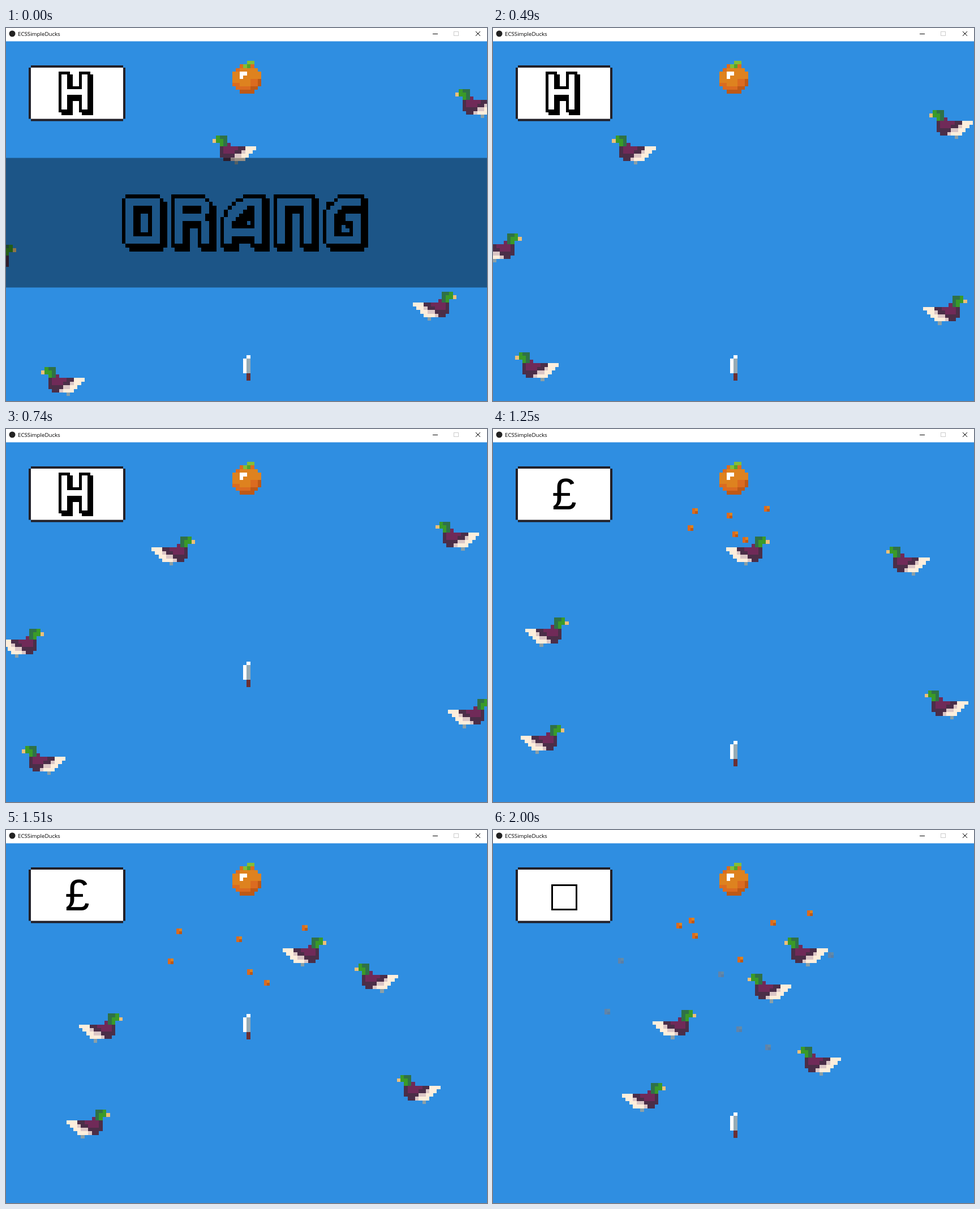
An HTML page with a canvas for the animation above (2250 ms loop, 850x659 px).

```html
<!DOCTYPE html>
<html lang="en">
<head>
<meta charset="utf-8">
<title>ECSSimpleDucks</title>
<style>
html, body { margin: 0; width: 100%; height: 100%; overflow: hidden; }
canvas { display: block; }
</style>
</head>
<body>
<canvas id="stage" width="850" height="659"></canvas>
<script>
const ctx = document.getElementById('stage').getContext('2d');
const LOOP = 2250;
const TICKS = [0, 240, 490, 740, 1000, 1250, 1510, 1750, 2000];
const LAUNCHES = [548, 1219, 1909];
const CELL = 6.43;

const COLORS = {
  g: '#3a9a28', G: '#2f7147', b: '#ecc07a', p: '#702a58', d: '#4b2e48',
  c: '#fdeedc', k: '#dbc6c6', a: '#8ba0a8',
  o: '#de821f', m: '#db6b20', r: '#bd5917', l: '#83bd38', L: '#55a22c',
  w: '#ffffff', s: '#97abb5', h: '#6b3034'
};

const DUCK = ['.gGG', 'bggG', '..gGp', '..dppppddccc', '..dpppddkcc',
  '..ddddkkcc', '...ddkccc'];
const ORANGE = ['....ll', '..mlLm', '.mooooo', 'oowwoooo', 'oowooooo',
  'ooooommr', 'mmooommr', '.mmmmrr', '..rrrr'];
const KNIFE = ['.w', 'ws', 'ws', 'ws', 'ws', '.h', '.h'];
const CRUMB = ['mo', 'mr'];

// Letter faces; "o" cells get an outline with cut corners
const rows = (n, row) => Array(n).fill(row);
const FULL = 'XXXXXXXXX', SIDES = 'XX.....XX', ROUND = 'oXXXXXXXo';
const GLYPHS = {
  H: [...rows(5, SIDES), FULL, FULL, ...rows(5, SIDES)],
  O: [ROUND, FULL, ...rows(8, SIDES), FULL, ROUND],
  R: ['XXXXXXXo', 'XXXXXXXXo', SIDES, SIDES, 'XXXXXXXo', 'XXXXXXXo', ...rows(6, SIDES)],
  A: ['.....oXXXX', '...oXXXXXX', '..oXXX..XX', '.oXXX...XX', '.XXX....XX',
    'oXX.....XX', 'XX......XX', 'XX......XX', 'XXXXXXXXXX', 'XXXXXXXXXX',
    'XX......XX', 'XX......XX'],
  N: [FULL, FULL, ...rows(10, SIDES)],
  G: ['...oXXXXX', '..oXXXXXX', '.XXX', 'oXX', 'XX...XXXX', 'XX...XXXX',
    ...rows(4, SIDES), FULL, ROUND]
};

// Ducks drift from (x, y) by (vx, vy) per tick, then fly to endX on their row
const TURN = 4.3;
const ROW_TOP = 190, ROW_GAP = 64.2;
const FLOCK = [
  { x: 794, y: 108, vx: -11.6, vy: 18.5, endX: 450, row: 1 },
  { x: -59, y: 383, vx: 16.3, vy: -10, endX: 282, row: 2 },
  { x: 719, y: 466, vx: 20.7, vy: 3.7, endX: 538, row: 3 },
  { x: 62, y: 599, vx: -11.4, vy: -13, endX: 228, row: 4 }
];

const BURSTS = [
  { start: 4.25, dirs: [[-82, 54], [-92, 91], [-9, 64], [71, 50], [4, 104], [25, 117]] },
  { start: 7.3, dirs: [[-94, 76], [-122, 88], [-86, 110], [89, 81], [171, 60], [15, 164]] }
];

function rect(color, x, y, w, h) {
  ctx.fillStyle = color;
  ctx.fillRect(x, y, w, h);
}

// Fills one grid cell, with edges on whole pixels
function cell(color, x, y, c, r, u) {
  const l = Math.round(x + c * u), t = Math.round(y + r * u);
  rect(color, l, t, Math.round(x + (c + 1) * u) - l, Math.round(y + (r + 1) * u) - t);
}

function sprite(art, x, y, u = CELL, flipWidth = 0) {
  art.forEach((row, r) => [...row].forEach((ch, c) => {
    if (ch !== '.') cell(COLORS[ch], x, y, flipWidth ? flipWidth - 1 - c : c, r, u);
  }));
}

// Block letter: outline plus the same outline dropped one cell right and down
function glyph(name, x, y, u, face) {
  const each = fn => GLYPHS[name].forEach((row, r) => [...row].forEach((ch, c) => {
    if (ch !== '.') fn(c + 1, r + 1, ch);
  }));
  each((c, r, ch) => {
    for (let dy = -1; dy <= 1; dy++)
      for (let dx = -1; dx <= 1; dx++) {
        if (ch === 'o' && dx && dy) continue;
        cell('#000', x, y, c + dx, r + dy, u);
        cell('#000', x, y, c + dx + 1, r + dy + 1, u);
      }
  });
  each((c, r) => cell(face, x, y, c, r, u));
}

function text(str, font, x, y, align) {
  ctx.fillStyle = '#000';
  ctx.font = font;
  ctx.textAlign = align;
  ctx.fillText(str, x, y);
}

function line(x0, y0, x1, y1) {
  ctx.beginPath();
  ctx.moveTo(x0, y0);
  ctx.lineTo(x1, y1);
  ctx.stroke();
}

function titleBar() {
  rect('#fff', 0, 0, 850, 23.5);
  ctx.fillStyle = '#222';
  ctx.beginPath();
  ctx.arc(11, 10, 5.5, 0, 7);
  ctx.fill();
  text('ECSSimpleDucks', '9.7px "Open Sans", sans-serif', 21, 14, 'left');
  ctx.lineWidth = 1;
  ctx.strokeStyle = '#ccc';
  ctx.strokeRect(791.5, 6.5, 8, 7);
  ctx.strokeStyle = '#000';
  line(754, 10.5, 763, 10.5);
  line(830, 6, 838, 14);
  line(838, 6, 830, 14);
}

function sign(f) {
  rect('#222028', 44, 66, 163, 98.5);
  rect('#222028', 40, 70, 171, 90.5);
  rect('#fff', 44, 70, 163, 90.5);
  if (f < 5) glyph('H', 92.5, 77, 5.15, '#fff');
  else if (f < 8) text('£', '78px "Liberation Sans", Arial, sans-serif', 126, 142, 'center');
  else {
    ctx.strokeStyle = '#000';
    ctx.lineWidth = 3;
    ctx.strokeRect(104.5, 97.5, 43, 43);
  }
}

function knife(t) {
  const start = LAUNCHES.filter(s => s <= t).pop() ?? t;
  sprite(KNIFE, 419, 578 - 0.871 * (t - start));
}

function crumbs(f) {
  for (const { start, dirs } of BURSTS) {
    const age = f - start;
    if (age < 0) continue;
    const spread = age ** 0.67;
    ctx.globalAlpha = Math.min(1, 1.6 - 0.35 * age);
    dirs.forEach(([dx, dy]) => sprite(CRUMB, 420 + dx * spread, 95 + dy * spread, 5));
  }
  ctx.globalAlpha = 1;
}

// The foot swings back while the duck is off its row
function duck(x, y, goesRight, onRow) {
  const foot = '.'.repeat(onRow ? 6 : 7) + 'a';
  sprite([...DUCK, foot], x, y, CELL, goesRight ? 12 : 0);
}

function patrol(f) {
  const left = 195, right = 579;
  const x = left + Math.abs(170 - 77.3 * f);
  duck(x > right ? 2 * right - x : x, ROW_TOP, f > 2.2 && x < right, true);
}

function flyer({ x, y, vx, vy, endX, row }, f) {
  const drift = Math.min(f, TURN), flight = f - drift;
  const rowY = ROW_TOP + ROW_GAP * row;
  x += vx * drift;
  y += vy * drift;
  if (!flight) return duck(x, y, vx > 0, false);

  const gap = Math.abs(rowY - y);
  const climb = Math.min(1, flight * Math.min(29, gap * 0.43) / gap);
  const along = (flight / (TICKS.length - 1 - TURN)) ** 1.07;
  duck(x + (endX - x) * along, y + (rowY - y) * climb, endX > x, climb === 1);
}

function banner() {
  rect('rgba(0,0,0,0.4)', 0, 229.5, 850, 229);
  const u = 6.7;
  let x = 204.5;
  for (const ch of 'ORANG') {
    glyph(ch, x, 294, u, '#1d5688');
    x += (GLYPHS[ch].at(-1).length + 4) * u;
  }
}

function draw(now) {
  const time = now % LOOP;
  const f = TICKS.filter(t => t <= time).length - 1;
  rect('#2f8ee1', 0, 0, 850, 659);
  titleBar();
  sign(f);
  sprite(ORANGE, 400, 58);
  crumbs(f);
  knife(TICKS[f]);
  patrol(f);
  FLOCK.forEach(d => flyer(d, f));
  if (f === 0) banner();
}

const begin = performance.now();
function loop() {
  draw(performance.now() - begin);
  requestAnimationFrame(loop);
}
loop();
</script>
</body>
</html>
```
